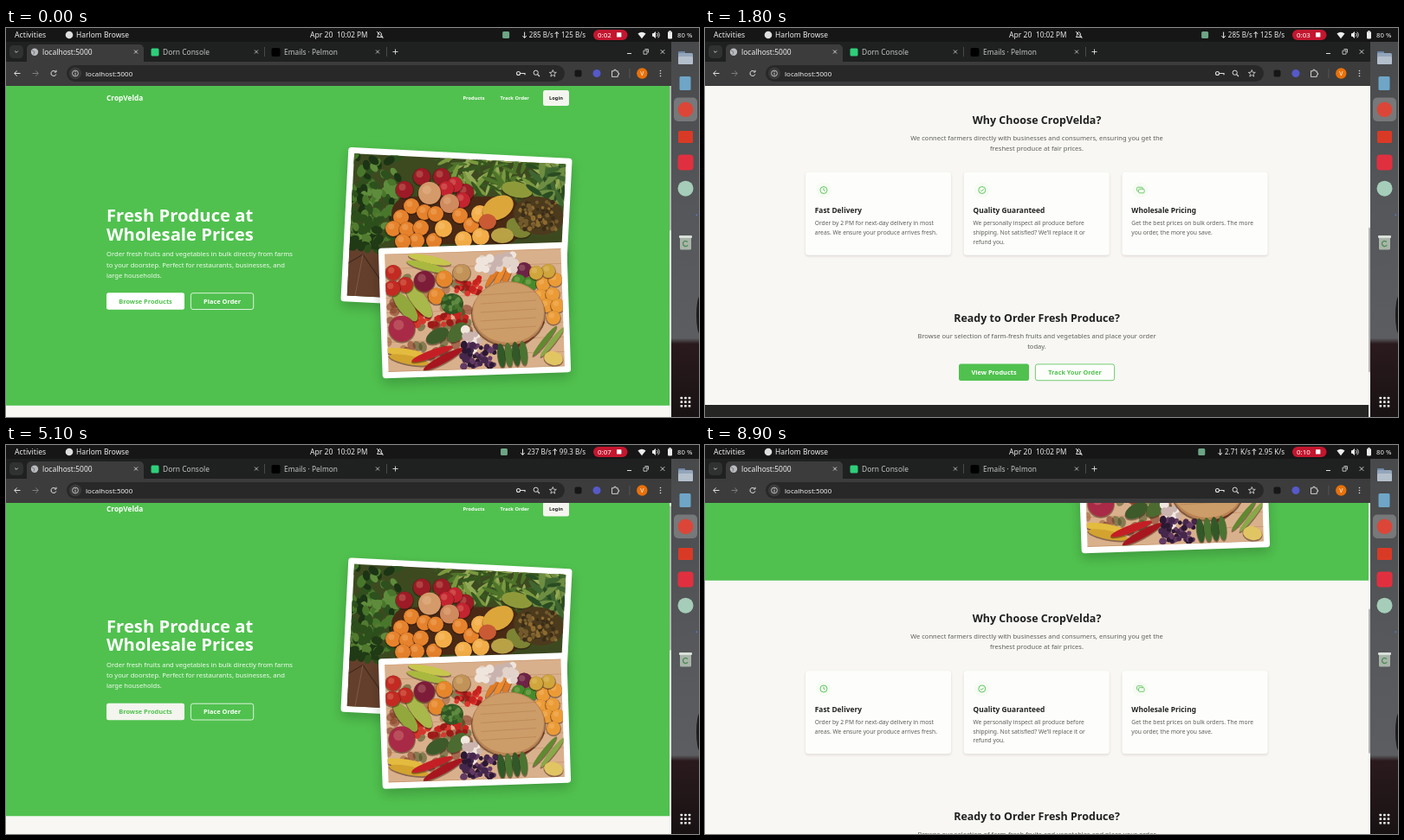
These frames come from a looping animation (800x450 px, 9000 ms). An HTML page with a canvas:

```html
<!DOCTYPE html>
<html lang="en">
<head>
<meta charset="utf-8">
<title>Produce shop</title>
<style>
html, body { margin: 0; width: 100%; height: 100%; overflow: hidden; background: #161616; }
canvas { display: block; width: 800px; height: 450px; }
</style>
</head>
<body>
<canvas id="stage" width="800" height="450"></canvas>
<script>
const ctx = document.getElementById('stage').getContext('2d');
const LOOP = 9000, TOP = 67, VIEW = 383, SCROLL_MAX = 493;
const GREEN = '#50c14e', PAPER = '#f8f7f4', INK = '#1f211f', GREY = '#5c5d59';
const BRAND = 'CropVelda';

// ---------- drawing helpers ----------

// Text is laid out at ten times its size so advances stay fractional.
function text(str, x, y, size, color, weight = 400, align = 'left') {
  ctx.save();
  ctx.translate(x, y);
  ctx.scale(0.1, 0.1);
  ctx.font = `${weight} ${size * 10}px "Noto Sans", "Open Sans", sans-serif`;
  ctx.textAlign = align;
  ctx.fillStyle = color;
  ctx.fillText(str, 0, 0);
  const width = ctx.measureText(str).width / 10;
  ctx.restore();
  return width;
}
const bold = (str, x, y, size, color, align) => text(str, x, y, size, color, 700, align);

function lines(rows, x, y, pitch, size, color, align) {
  rows.forEach((row, i) => text(row, x, y + i * pitch, size, color, 400, align));
}

function rect(x, y, w, h, fill, r = 0, stroke) {
  ctx.beginPath();
  ctx.roundRect(x, y, w, h, r);
  if (fill) { ctx.fillStyle = fill; ctx.fill(); }
  if (stroke) { ctx.strokeStyle = stroke; ctx.lineWidth = 0.8; ctx.stroke(); }
}

function oval(x, y, rx, fill, ry = rx, turn = 0) {
  ctx.beginPath();
  ctx.ellipse(x, y, rx, ry, turn, 0, 7);
  ctx.fillStyle = fill;
  ctx.fill();
}

function ring(x, y, r, color, width = 0.9, from = 0, to = 6.3) {
  ctx.beginPath();
  ctx.arc(x, y, r, from, to);
  ctx.strokeStyle = color;
  ctx.lineWidth = width;
  ctx.stroke();
}

function path(color, width, ...pts) {
  ctx.beginPath();
  for (let i = 0; i < pts.length; i += 2) ctx.lineTo(pts[i], pts[i + 1]);
  ctx.strokeStyle = color;
  ctx.lineWidth = width;
  ctx.stroke();
}

function shadow(color, blur, dy, draw) {
  ctx.save();
  ctx.shadowColor = color;
  ctx.shadowBlur = blur;
  ctx.shadowOffsetY = dy;
  draw();
  ctx.restore();
}

function random(seed) {
  return () => (seed = (seed * 16807) % 2147483647) / 2147483647;
}

function scatter(seed, n, x, y, w, h, r, colors, stretch = 1) {
  const rnd = random(seed * 7919 + 13);
  for (let i = 0; i < n; i++) {
    const size = r * (0.75 + rnd() * 0.5);
    oval(x + rnd() * w, y + rnd() * h, size * stretch, colors[i % colors.length], size, rnd() * 3.1);
  }
}

const SHADE = 'rgba(45,18,8,.45)';

// Each blob: colour, x, y, rx, ry, turn
const blobs = list => list.forEach(([c, x, y, rx, ry, turn]) => {
  oval(x, y + 1.2, rx + 0.6, SHADE, ry + 0.6, turn);
  oval(x, y, rx, c, ry, turn);
});

function fruit(color, r, ...pts) {
  for (let i = 0; i < pts.length; i += 2) {
    oval(pts[i], pts[i + 1] + 0.8, r + 0.9, SHADE);
    oval(pts[i], pts[i + 1], r, color);
    oval(pts[i] - r * 0.25, pts[i + 1] - r * 0.3, r * 0.4, 'rgba(255,225,180,.2)');
  }
}

// ---------- photographs, simplified ----------

function framed(cx, cy, w, h, degrees, border, draw) {
  const turn = degrees * Math.PI / 180;
  ctx.save();
  ctx.translate(cx, cy);
  ctx.rotate(turn);
  shadow('rgba(0,0,0,.2)', 14, 6, () => rect(-w / 2, -h / 2, w, h, '#fff', 3.5));
  ctx.beginPath();
  ctx.rect(border - w / 2, border - h / 2, w - 2 * border, h - 2 * border);
  ctx.clip();
  ctx.rotate(-turn);
  ctx.translate(-cx, -cy);
  draw();
  ctx.restore();
}

function harvest() {
  rect(380, 130, 280, 200, '#3d4a20');
  rect(385, 255, 60, 70, '#643f2c');
  path('#3f281c', 1.2, 388, 276, 412, 262, 434, 294);
  path('#8a6048', 0.8, 412, 262, 402, 315);
  scatter(2, 110, 398, 145, 55, 98, 4, ['#2c511d', '#48772c', '#5f8c3c', '#1b3414'], 1.5);
  scatter(3, 110, 500, 146, 150, 42, 2.2, ['#7a983f', '#4e742a', '#93a956', '#36571f'], 5);
  scatter(4, 40, 398, 215, 34, 42, 4, ['#2c4f1b', '#527b30', '#1f3a15'], 1.4);
  rect(445, 195, 150, 55, '#4a2a15', 20);
  fruit('#9c1b26', 10, 460, 187, 480, 172, 503, 172, 530, 190);
  fruit('#c32430', 9, 518, 181, 527, 199, 508, 186);
  fruit('#d49a6a', 13, 489, 191);
  fruit('#cf8a5e', 11, 512, 203);
  fruit('#e6822c', 9, 468, 206, 483, 213, 456, 219, 496, 215, 447, 232, 463, 233, 479, 231, 474, 246, 458, 247, 494, 246, 524, 217, 537, 228);
  fruit('#f3ae48', 10, 505, 232, 528, 245, 548, 241, 547, 215);
  blobs([['#8e9a3a', 590, 187, 18, 9, 0.2], ['#dda63b', 568, 208, 19, 13, -0.5],
    ['#7d8434', 592, 231, 15, 11, 0.4], ['#c95a33', 556, 224, 10, 9, 0], ['#b9a246', 573, 240, 13, 9, 0]]);
  scatter(5, 30, 605, 160, 42, 40, 3, ['#3f6630', '#6d8d42', '#294c22'], 3.5);
  oval(615, 217, 29, '#4c3a1c', 22, 0.2);
  scatter(6, 75, 594, 201, 43, 32, 2.2, ['#8d6b30', '#3a2d18', '#735a2c']);
}

function board() {
  rect(425, 240, 235, 170, '#d9b08c');
  for (let y = 262; y < 405; y += 17) path('#c4956d', 0.8, 425, y, 655, y - 7);
  scatter(11, 60, 440, 285, 95, 95, 5, ['rgba(125,50,30,.55)', 'rgba(70,80,35,.55)', 'rgba(150,85,45,.5)'], 1.3);
  scatter(7, 22, 520, 288, 28, 20, 3.4, ['#c8231f', '#9d1a18', '#dd352d']);
  scatter(12, 36, 470, 328, 62, 16, 3.4, ['#c8231f', '#9d1a18', '#d5382c']);
  blobs([['#c7c64d', 489, 268, 25, 4.5, 0.2], ['#a9b93f', 486, 276, 24, 4.5, 0.25],
    ['#a9b84a', 476, 314, 25, 8.5, 0.95], ['#92a83c', 461, 322, 21, 8, 0.9],
    ['#e07a25', 562, 287, 15, 3, -1], ['#ee8a2c', 570, 287, 17, 3.3, -1.1],
    ['#e07a25', 579, 285, 16, 3.3, -1.2], ['#3d5a2a', 498, 356, 14, 8, -0.5],
    ['#4b6b31', 521, 352, 14, 8.5, -0.8], ['#e3bb3e', 461, 376, 24, 5, 0.15],
    ['#d3a32f', 465, 384, 23, 5, 0.2], ['#c51f26', 492, 377, 25, 4.5, -0.35],
    ['#a7161f', 505, 383, 26, 4.5, -0.5], ['#c5212a', 605, 353, 21, 3.2, -0.7],
    ['#b01c24', 598, 362, 14, 3, -0.6], ['#5f8a30', 622, 362, 22, 3, -0.9],
    ['#88a947', 631, 363, 22, 3, -0.9], ['#e2c563', 632, 382, 11, 8, 0.2]]);
  fruit('#c22a22', 9, 447, 283, 461, 297, 446, 301);
  fruit('#7d1c39', 12, 483, 293);
  fruit('#6d2345', 9, 598, 280);
  fruit('#e5862b', 9.5, 506, 290, 497, 310);
  fruit('#c29358', 10, 526, 283);
  fruit('#468a2b', 8, 592, 293, 605, 296);
  fruit('#eb9b36', 8, 620, 296, 634, 291, 617, 310, 631, 308, 624, 321, 637, 321, 632, 335);
  fruit('#cfa53c', 8, 626, 281, 612, 283);
  fruit('#a92a46', 15, 457, 348);
  scatter(8, 30, 545, 261, 42, 19, 5, ['#efe5dd', '#c9b3ae', '#e2d3cb']);
  scatter(9, 18, 528, 346, 20, 26, 4.5, ['#f1e8df', '#cbb4ae']);
  scatter(10, 55, 526, 365, 40, 28, 3.2, ['#45274c', '#633a63', '#2b1832']);
  oval(515, 319, 13, '#2f5522', 12);
  scatter(13, 26, 505, 310, 20, 17, 2.6, ['#47752f', '#5f8a41', '#3a6428']);
  oval(580, 332, 43, 'rgba(70,35,15,.6)', 37);
  oval(580, 330, 42, '#b98353', 37);
  oval(580, 329, 41, '#cc9c69', 35);
  for (let i = -2; i < 3; i++) path('rgba(150,95,50,.35)', 0.8, 548, 329 + i * 10, 612, 325 + i * 10);
  for (let i = 0; i < 4; i++) blobs([[i % 2 ? '#4a7431' : '#315928', 572 + i * 8.5, 379 - i, 4.4, 14, -0.12]]);
}

// Product photos use a 125 x 85 box.
const photos = [
  () => {
    rect(0, 0, 125, 85, '#454b58');
    rect(0, 60, 125, 25, '#59565a');
    oval(62, 54, 60, '#25282f', 28);
    fruit('#80192a', 17, 38, 46, 67, 52, 94, 43, 42, 22);
    fruit('#9c2635', 16, 69, 24, 55, 40, 86, 58);
    oval(62, 68, 57, '#30333a', 15);
  },
  () => {
    rect(0, 0, 125, 85, '#3c592f');
    scatter(20, 45, 0, 0, 125, 48, 8, ['#58803d', '#29432a', '#6c9347', '#344f2d'], 1.3);
    rect(0, 64, 125, 21, '#71848b');
    path('#4d5e66', 1, 0, 74, 125, 74);
    oval(66, 50, 52, '#292b2c', 17);
    scatter(21, 65, 30, 18, 42, 45, 4.6, ['#9fbb54', '#c3d179', '#7d9d3c']);
    scatter(22, 55, 62, 31, 48, 36, 4.6, ['#8f3c53', '#672a40', '#ae6070']);
    scatter(23, 12, 25, 55, 30, 18, 4.5, ['#b2c865', '#8dad47']);
  },
  () => {
    rect(0, 0, 125, 85, '#397328');
    scatter(24, 55, 0, 0, 125, 65, 10, ['#4c942f', '#71b34b', '#2d6723', '#5aa23a'], 2);
    rect(98, 50, 27, 35, '#22391f');
    for (let i = 0; i < 11; i++) path(i % 2 ? '#8dbd62' : '#609b3e', 3, 68 + (i % 3), 49, 38 + i * 6, 86);
    scatter(25, 12, 18, 8, 80, 32, 10, ['#63aa40', '#3e852c'], 2);
  },
  () => {
    rect(0, 0, 125, 85, '#55443e');
    rect(0, 0, 43, 38, '#94867f');
    oval(72, 55, 66, '#8b5b38', 28);
    oval(72, 52, 59, '#5f3928', 24);
    fruit('#c2271f', 16, 45, 57, 40, 32, 78, 30);
    fruit('#d93426', 14, 62, 22, 99, 34, 60, 39);
    oval(80, 61, 15, '#d9442f', 8, -0.3);
    oval(80, 60, 10, '#ef8a6c', 4, -0.3);
    oval(101, 55, 11, '#dd4b33', 7, 0.8);
    scatter(26, 9, 30, 12, 65, 20, 2, ['#4c6e2d'], 3);
  }
];

// ---------- pages ----------

function nav() {
  bold(BRAND, 116, 84, 8.3, '#fff');
  bold('Products', 527.5, 83, 5.7, '#fff');
  bold('Track Order', 570.5, 83, 5.7, '#fff');
  rect(620, 72, 30, 18, '#f5f5f0', 2.5);
  bold('Login', 635, 83, 5.7, INK, 'center');
}

function button(label, x, y, w, fill, color, border, h = 19.5, size = 7.4) {
  rect(x, y, w, h, fill, 2.5, border);
  bold(label, x + w / 2, y + h / 2 + size * 0.36, size, color, 'center');
}

function footer(y) {
  const soft = '#d0d0cc';
  rect(0, y, 766, 134, '#252523');
  bold(BRAND, 102, y + 23.3, 8.3, '#fff');
  lines(['Your trusted partner for bulk fresh produce ordering,',
    'delivering quality fruits and vegetables at wholesale', 'prices.'], 102, y + 40.7, 10.7, 6.75, soft);
  bold('Quick Links', 294, y + 21.8, 6.7, '#fff');
  lines(['Products', 'Cart', 'Track Order', 'Admin'], 294, y + 39.2, 14.1, 6.75, soft);
  bold('Contact Us', 486, y + 21.8, 6.7, '#fff');
  lines(['907 Tamsel Street', 'Varelpore, Norkanda 418206', 'Email: care@cropvelda.example',
    'Phone: +91 0005550142'], 486, y + 39.2, 14.1, 6.75, soft);
  rect(102, y + 98.7, 562, 0.7, '#41413e');
  text('© 2025 ' + BRAND + '. All rights reserved.', 383, y + 117.2, 6.75, '#a3a39e', 400, 'center');
}

const features = [
  ['Fast Delivery', 'Order by 2 PM for next-day delivery in most', 'areas. We ensure your produce arrives fresh.'],
  ['Quality Guaranteed', 'We personally inspect all produce before', 'shipping. Not satisfied? We’ll replace it or', 'refund you.'],
  ['Wholesale Pricing', 'Get the best prices on bulk orders. The more', 'you order, the more you save.']
];

function featureIcon(kind, x, y) {
  oval(x, y, 9, '#f6fbf3');
  if (kind < 2) ring(x, y, 4, GREEN);
  if (kind === 0) path(GREEN, 0.9, x, y - 2.3, x, y, x + 1.6, y + 1);
  if (kind === 1) path(GREEN, 0.9, x - 1.7, y, x - 0.4, y + 1.3, x + 1.8, y - 1.2);
  if (kind === 2) {
    rect(x - 4, y - 3.3, 6.5, 4.6, null, 1, GREEN);
    rect(x - 2, y - 1.3, 6.5, 4.6, '#f6fbf3', 1, GREEN);
  }
}

function home(hover) {
  rect(0, TOP, 766, 369.8, GREEN);
  nav();
  bold('Fresh Produce at', 116, 224.4, 20.25, '#fff');
  bold('Wholesale Prices', 116, 245.9, 20.25, '#fff');
  lines(['Order fresh fruits and vegetables in bulk directly from farms',
    'to your doorstep. Perfect for restaurants, businesses, and', 'large households.'],
    116, 264.2, 12.3, 7.62, '#f3fbf2');
  button('Browse Products', 116, 306.3, 90, hover ? '#f3f5ee' : '#fff', GREEN);
  button('Place Order', 213.4, 306.7, 72.3, null, '#fff', '#fff', 18.8);
  framed(520, 233.5, 258.5, 178.5, 2.9, 7, harvest);
  framed(541, 326.5, 217.5, 150.5, -1.9, 7, board);

  bold('Why Choose ' + BRAND + '?', 383, 485.3, 12.5, INK, 'center');
  lines(['We connect farmers directly with businesses and consumers, ensuring you get the',
    'freshest produce at fair prices.'], 383, 504, 12.2, 7.55, GREY, 'center');
  features.forEach(([title, ...body], i) => {
    const x = 116 + i * 182.8;
    shadow('rgba(80,40,40,.16)', 3, 1.2, () => rect(x, 541.3, 168, 96, '#fdfefb', 3.5));
    featureIcon(i, x + 21, 562);
    bold(title, x + 10.7, 588.8, 8.4, INK);
    lines(body, x + 10.7, 602.9, 10.6, 6.73, GREY);
  });

  bold('Ready to Order Fresh Produce?', 383, 714.4, 12.5, INK, 'center');
  lines(['Browse our selection of farm-fresh fruits and vegetables and place your order', 'today.'],
    383, 733.3, 12.2, 7.55, GREY, 'center');
  button('View Products', 293, 763, 81, GREEN, '#fff');
  button('Track Your Order', 381.4, 763.4, 91.2, '#fdfefb', GREEN, GREEN, 18.8, 7.3);
  footer(810.5);
}

const goods = [
  ['Apples', '₹50/kg', 'Fruits', 'Fresh ones'],
  ['grapes', '₹20/bunch', 'Fruits', 'Fresh Fruits'],
  ['Spinach', '₹25/bunch', 'Leafy Greens', 'Fresh ones'],
  ['Tomatoes', '₹30/kg', 'Vegetables', 'Fresh ones']
];

function productCard([name, price, kind, note], i, loaded) {
  const x = 116.3 + i * 136.2;
  shadow('rgba(0,0,0,.2)', 4, 1.2, () => rect(x, 181.3, 125, 164.5, '#fff', 3));
  ctx.save();
  ctx.beginPath();
  ctx.roundRect(x, 181.3, 125, 84.7, [3, 3, 0, 0]);
  ctx.clip();
  ctx.translate(x, 181.3);
  if (loaded) photos[i](); else rect(0, 0, 125, 85, '#eeeeea');
  ctx.restore();
  bold(name, x + 7.4, 281.8, 7.5, INK);
  bold(price, x + 117.8, 281.8, 7.5, GREEN, 'right');
  ctx.font = '60px "Noto Sans", "Open Sans", sans-serif';
  rect(x + 7.4, 287.4, ctx.measureText(kind).width / 10 + 6.5, 11.8, '#f2f2ed', 2);
  text(kind, x + 10.6, 295.4, 6, '#3d3e3b');
  text(note, x + 7.4, 311.1, 5.95, GREY);
  button('Add to Order', x + 7.2, 320.4, 110.7, GREEN, '#fff', null, 17.6, 5.9);
}

const chevron = (x, y, color) => path(color, 0.9, x - 1.8, y - 0.9, x, y + 0.9, x + 1.8, y - 0.9);

function products(loaded) {
  shadow('rgba(0,0,0,.2)', 4, 1, () => rect(0, TOP, 766, 28, GREEN));
  nav();
  bold('Fresh Produce Catalog', 116, 121.9, 12.5, INK);
  text('Browse our selection of fresh fruits and vegetables for bulk ordering', 116, 136, 6.77, GREY);
  rect(116.4, 153.4, 111.6, 17.2, '#fff', 2.5, '#d9d9d4');
  ring(124.2, 161.4, 2.2, '#858681', 0.8);
  path('#858681', 0.8, 125.8, 163, 127.4, 164.6);
  text('Search products...', 134, 164.1, 5.8, '#7b7c78');
  rect(539.4, 153.4, 53.2, 17.2, '#fff', 2.5, '#d9d9d4');
  text('All...', 558.5, 164.1, 6, INK);
  chevron(583.5, 162, '#999');
  rect(597, 153.4, 52.8, 17.2, '#fff', 2.5, '#d9d9d4');
  text('Name (A-Z)', 602, 164.1, 5.95, INK);
  chevron(641.5, 162, '#999');
  goods.forEach((item, i) => productCard(item, i, loaded));
  footer(360);
}

// ---------- desktop and browser frame ----------

function rates(t) {
  if (t < 2000) return ['285 B/s', '125 B/s'];
  if (t < 5000) return ['44.0 B/s', '57.3 B/s'];
  if (t < 8000) return ['237 B/s', '99.3 B/s'];
  return ['2.71 K/s', '2.95 K/s'];
}

// Right-aligned rate with an arrow in front; returns the arrow's left edge.
function rate(label, right, dir, color) {
  const x = right - text(label, right, 10.9, 8.05, color, 400, 'right') - 5.2;
  const tip = 8 + dir * 3.4;
  path(color, 1, x, 8 - dir * 3.4, x, tip);
  path(color, 1, x - 2.2, tip - dir * 2.3, x, tip, x + 2.2, tip - dir * 2.3);
  return x - 2.5;
}

function topBar(t) {
  const pale = '#ececec';
  rect(0, 0, 800, 16, '#161616');
  text('Activities', 10, 11, 8.7, pale);
  oval(73, 8, 4.3, '#dedede');
  text('Harlom Browse', 81, 11, 8.45, pale);
  text('Apr 20', 351, 11, 8.6, pale);
  text('10:02 PM', 382, 11, 8.2, pale);
  path(pale, 0.9, 428.5, 10.5, 429.5, 8.5, 429.8, 6, 431.5, 4.6, 433.2, 6, 433.6, 8.5, 434.8, 10.5, 428.5, 10.5);
  path(pale, 0.9, 428, 4, 435.5, 12);
  const [down, up] = rates(t);
  const left = rate(down, rate(up, 669, -1, pale) - 1.5, 1, pale);
  rect(left - 23, 4, 8, 8, '#6da585', 1.5);
  rect(678, 2, 39.5, 12, '#c4162f', 6);
  text('0:' + String(2 + Math.floor(t / 1000)).padStart(2, '0'), 683, 10.9, 8, '#fff');
  rect(705, 5.2, 5.4, 5.4, '#fff', 0.5);
  ctx.beginPath();
  ctx.moveTo(734, 12.3);
  ctx.arc(734, 12.3, 7.3, -2.25, -0.9);
  ctx.fillStyle = pale;
  ctx.fill();
  rect(746, 6.3, 2, 3.4, pale);
  ctx.beginPath();
  [[747, 6.5], [750, 4], [750, 12], [747, 9.5]].forEach(p => ctx.lineTo(...p));
  ctx.fill();
  ring(749.5, 8, 2.7, pale, 0.9, -0.9, 0.9);
  ring(749.5, 8, 4.7, pale, 0.9, -0.8, 0.8);
  rect(764, 4.2, 5, 8.2, pale, 0.8);
  rect(765.4, 3, 2.2, 1.4, pale);
  text('80 %', 775, 10.9, 7.8, pale);
}

const cross = (x, y, r, color) => {
  path(color, 0.9, x - r, y - r, x + r, y + r);
  path(color, 0.9, x - r, y + r, x + r, y - r);
};

function browser(site) {
  const pale = '#dedede', dim = '#c4c4c4';
  rect(0, 16, 768, 23, '#1f2020');
  rect(4, 20, 16, 15, '#303131', 4.5);
  chevron(12, 27.5, pale);
  rect(24, 19, 135, 22, '#3c3c3c', [5, 5, 0, 0]);
  rect(0, 39, 768, 28, '#3c3c3c');
  oval(33, 27.8, 4.2, '#b9bbbe');
  path('#66696c', 0.8, 30, 26, 33, 27.5, 32, 30.5);
  text(site, 42, 30.7, 8.5, '#eee');
  cross(150, 27.5, 2, pale);
  rect(167.5, 23.5, 9, 9, '#2ecf79', 1.5);
  text('Dorn Console', 181, 30.7, 8.45, dim);
  cross(289, 27.5, 2, dim);
  rect(298, 22, 0.8, 11, '#555');
  rect(306.5, 23, 10, 10, '#000', 2);
  text('Emails · Pelmon', 321, 30.7, 8.35, dim);
  cross(429, 27.5, 2, dim);
  rect(439, 22, 0.8, 11, '#555');
  path(pale, 0.9, 446.5, 27.5, 452.5, 27.5);
  path(pale, 0.9, 449.5, 24.5, 449.5, 30.5);
  path(pale, 1, 717, 29.5, 722, 29.5);
  rect(736, 26.2, 4, 4, null, 0, pale);
  path(pale, 0.9, 737.5, 24.6, 741.4, 24.6, 741.4, 28.6);
  cross(758, 27.5, 2.3, pale);

  path(pale, 1, 16.5, 52.5, 9.8, 52.5);
  path(pale, 1, 12.8, 49.4, 9.7, 52.5, 12.8, 55.6);
  path('#7d7d7d', 1, 30.5, 52.5, 37.2, 52.5);
  path('#7d7d7d', 1, 34.2, 49.4, 37.3, 52.5, 34.2, 55.6);
  ring(55, 52.5, 3, pale, 1, 0.3, 5.5);
  path(pale, 1, 58, 48.8, 58, 51, 55.8, 51);
  rect(70, 43, 575, 19, '#282828', 9.5);
  oval(80, 52.5, 7, '#3a3a3a');
  ring(80, 52.5, 3.4, pale, 0.8);
  path(pale, 0.9, 80, 52, 80, 54.5);
  rect(79.5, 50.3, 1, 1, pale);
  text(site, 92, 55.5, 8, '#eee');
  ring(591.5, 52.5, 2, pale, 1.1);
  path(pale, 1.2, 593.5, 52.5, 599, 52.5, 599, 54.3);
  ring(611.7, 51.7, 2.6, pale, 1);
  path(pale, 1.1, 613.6, 53.6, 616, 56);
  ctx.beginPath();
  for (let i = 0; i < 10; i++) {
    const r = i % 2 ? 1.8 : 4.2, a = i * Math.PI / 5 - Math.PI / 2;
    ctx.lineTo(631.3 + r * Math.cos(a), 52.7 + r * Math.sin(a));
  }
  ctx.closePath();
  ctx.strokeStyle = pale;
  ctx.lineWidth = 0.8;
  ctx.stroke();
  rect(656.5, 48.5, 8, 8, '#161616', 2);
  oval(682, 52.5, 4.5, '#5659c9');
  path(pale, 0.9, 699.5, 49.8, 702, 49.8, 702, 48.3, 704, 48.3, 704, 49.8, 706.3, 49.8, 706.3, 52, 707.6, 52,
    707.6, 54, 706.3, 54, 706.3, 56.4, 699.5, 56.4, 699.5, 49.4);
  rect(719.5, 47, 0.8, 11, '#5a5a5a');
  oval(734.3, 52.5, 6.2, '#e8710a');
  text('V', 734.3, 55, 7, '#fff', 400, 'center');
  for (let i = -1; i < 2; i++) oval(755.5, 52.5 + i * 3, 0.8, pale);
}

function dock() {
  const wash = ctx.createLinearGradient(0, 16, 0, 450);
  [[0, '#47494b'], [0.45, '#55575a'], [0.79, '#5c5d60'], [0.805, '#2a1a1d'], [1, '#181213']]
    .forEach(stop => wash.addColorStop(...stop));
  rect(768, 16, 32, 434, wash);
  oval(801, 332, 4, '#1d1b1c', 22);
  rect(776, 27, 8, 5, '#6d87a8', 1);
  rect(776, 29, 17, 13, '#93a5ba', 1.5);
  rect(776, 33, 17, 9, '#b4bfcc', 1.5);
  rect(777.5, 56, 13, 16, '#6fa6c8', 1.5);
  rect(771, 80.5, 27, 27.5, '#777879', 5);
  oval(784.5, 94.3, 8.8, '#dc4638');
  rect(776, 119, 17, 14, '#d93a26', 1.5);
  rect(775.5, 146.5, 18, 18, '#e0303f', 4);
  oval(784.5, 185.7, 9, '#a5cdb9');
  rect(796.5, 215.5, 1.6, 1.6, '#5978d8');
  rect(778, 240.5, 13, 16, '#a9b5a9', 1.5);
  rect(777, 240, 15, 3, '#d9dfd8', 1);
  ring(784.5, 249.5, 3, '#4c8b55', 1.3, 0.5, 5.6);
  for (let i = 0; i < 9; i++) rect(778.5 + (i % 3) * 4.6, 426.7 + Math.floor(i / 3) * 4.6, 2.6, 2.6, '#f3f3f3', 0.6);
}

// ---------- timeline ----------

const smooth = p => p * p * (3 - 2 * p);

function scrollAt(t) {
  if (t < 2000) return SCROLL_MAX * (t / 2000) ** 2.61;
  if (t <= 3000) return SCROLL_MAX;
  if (t < 3800) return SCROLL_MAX * (1 - smooth((t - 3000) / 800));
  if (t >= 4000 && t < 5400) return 7.5;
  return t > 8600 ? 280 * (t - 8600) / 300 : 0;
}

function draw(t) {
  const shop = t >= 5400 && t < 7900;
  const scroll = scrollAt(t);
  const height = shop ? 426 : VIEW + SCROLL_MAX;
  ctx.clearRect(0, 0, 800, 450);
  rect(0, TOP, 768, VIEW, PAPER);
  ctx.save();
  ctx.beginPath();
  ctx.rect(0, TOP, 766, VIEW);
  ctx.clip();
  ctx.translate(0, -scroll);
  if (shop) products(t >= 5700); else home(t >= 4900 && t < 5400);
  ctx.restore();
  rect(766, TOP, 2, VIEW, '#f4f4f4');
  rect(766, TOP + scroll * VIEW / height, 2, VIEW * VIEW / height, '#b4b4b4', 1);
  browser('localhost:5000' + (shop ? '/products' : ''));
  topBar(t);
  dock();
}

let shown = -1;
function tick() {
  const t = Math.floor(performance.now() % LOOP / 100) * 100;
  if (t !== shown) draw(shown = t);
  requestAnimationFrame(tick);
}
tick();
</script>
</body>
</html>
```
